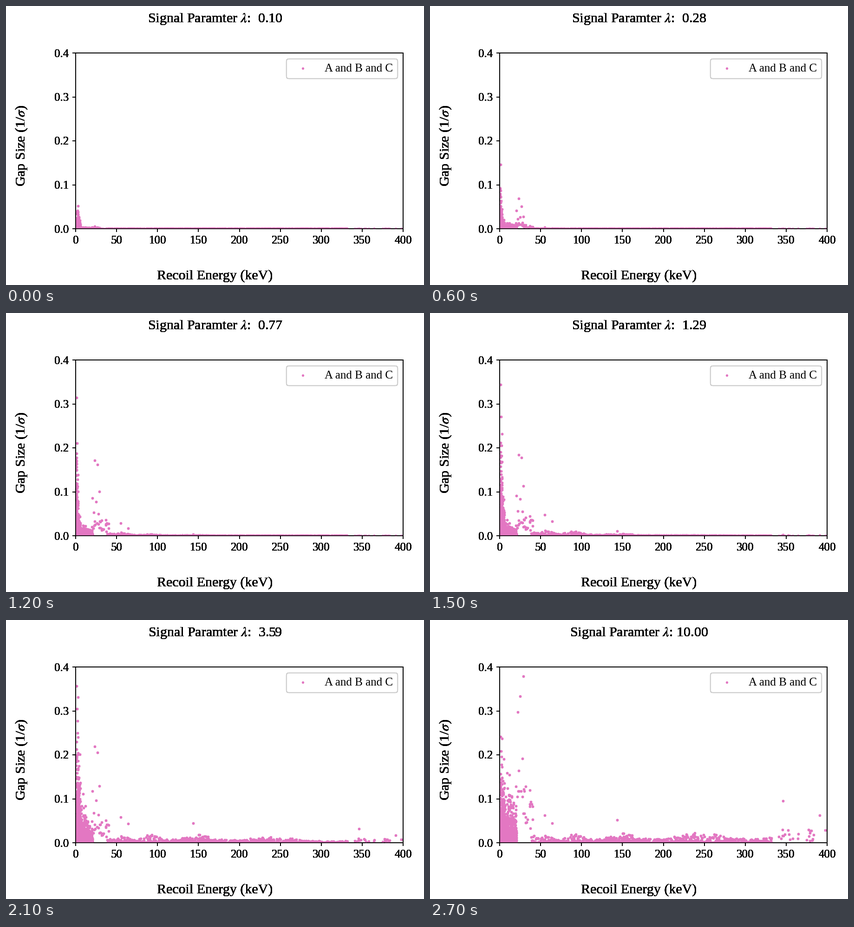
Recreate the animation shown at these times as a matplotlib script. Size 900 by 600 pixels, loop 3000 ms.

```python
import matplotlib.pyplot as plt
import numpy as np
from matplotlib.animation import FuncAnimation

W, H, DPI = 900, 600, 150
STEPS, INTERVAL = 10, 300
OVERDRAW = 8  # repeated passes give the heavy, hard-edged look
PINK = "#e377c2"
LAMBDAS = np.logspace(-1, 1, STEPS)

plt.rcParams.update({
    "font.family": "Liberation Serif",
    "font.size": 12,
    "mathtext.fontset": "stix",
})

rng = np.random.default_rng(7)

# The most prominent events: energy and size
LANDMARKS = np.array([
    (20.5, .303), (22, .131), (23, .370), (25, .136), (26.5, .261),
    (29, .147), (55, .056), (64, .042), (143.5, .046), (346, .069),
    (391, .043), (398, .020),
])


def sigmoid(x):
    return 1 / (1 + np.exp(-x))


def low_response(energy, step):
    """Peak gap size below 20 keV: a front that moves up in energy."""
    fade = 1 - .6 * (max(step - 7, 0) / 2) ** 2
    peak = .15 + .2 * fade / (1 + (energy / 5) ** 4)
    front = peak * sigmoid(1.2 * (step - 2.7 - 1.85 * np.log(energy)))
    first = .05 * np.exp(-(energy - 3) ** 2 / 5) * .6 ** step
    return front + first + .02 * sigmoid(1.2 * (step - 1.5))


def high_response(energy, step):
    """Gain above 20 keV: the same front, then a late surge below 45 keV."""
    plateau = (1.05 + .5 * (energy / 346) ** 2
               - .8 * np.exp((20 - energy) / 8))
    front = plateau * sigmoid(1.5 * (step + 3.7 - 1.93 * np.log(energy)))
    surge = 1.85 * sigmoid((42 - energy) / 4) * .22 ** (STEPS - 1 - step)
    return front + surge


def scatter_events(count, e_min, e_max, s_min, s_max):
    return np.column_stack([rng.uniform(e_min, e_max, count),
                            rng.uniform(s_min, s_max, count)])


def low_events():
    near = .7 + 4.3 * rng.random(450) ** 1.4
    mid = rng.uniform(4.8, 20.5, 700)
    energy = np.concatenate([near, mid])
    size = np.minimum(rng.exponential(1 / 6.3, energy.size), 1)
    return np.column_stack([energy, size])


def band_events():
    """Dense band along the axis, with waves that widen with energy."""
    energy = rng.uniform(39, 332, 1300)
    wave = np.cos(2 * np.pi * np.log(energy / 57) / np.log(1.62))
    size = (.013 + .006 * wave) * rng.random(energy.size) ** 4
    return np.column_stack([energy, size])


low = low_events()
high = np.vstack([
    LANDMARKS,
    scatter_events(7, 21, 28.5, .04, .08),
    scatter_events(18, 28.5, 40.5, .005, .05),
    scatter_events(22, 333, 386, .001, .024),
    band_events(),
])


def event_positions(step):
    groups = [(low, low_response), (high, high_response)]
    return np.vstack([
        np.column_stack([events[:, 0],
                         events[:, 1] * response(events[:, 0], step)])
        for events, response in groups])


def heavy_text(x, y, text, **style):
    return [fig.text(x / W, 1 - y / H, text, fontsize=14.4, ha="center",
                     va="baseline", **style) for _ in range(OVERDRAW)]


def add_layer(layer):
    ax = fig.add_axes([150 / W, 121 / H, 705 / W, 378 / H],
                      facecolor="none", zorder=layer)
    ax.set(xlim=(0, 400), ylim=(0, .4),
           xticks=np.arange(0, 401, 50), yticks=np.arange(5) / 10)
    dots = ax.scatter([], [], s=1, linewidths=1.5, color=PINK,
                      label="A and B and C")
    ax.legend(loc="upper right", handletextpad=.86)
    return dots


fig = plt.figure(figsize=(W / DPI, H / DPI), dpi=DPI, facecolor="white")
dot_layers = [add_layer(layer) for layer in range(OVERDRAW)]
titles = heavy_text(450, 35, "")
heavy_text(450, 588, "Recoil Energy (keV)")
heavy_text(41, 300, r"Gap Size (1/$\sigma$)", rotation=90,
           rotation_mode="anchor")


def update(step):
    positions = event_positions(step)
    for dots in dot_layers:
        dots.set_offsets(positions)
    for title in titles:
        title.set_text(rf"Signal Paramter $\lambda$: {LAMBDAS[step]:5.2f}")
    return [*dot_layers, *titles]


anim = FuncAnimation(fig, update, frames=STEPS, init_func=lambda: update(0),
                     interval=INTERVAL, repeat=True, repeat_delay=0)
plt.show()
```
